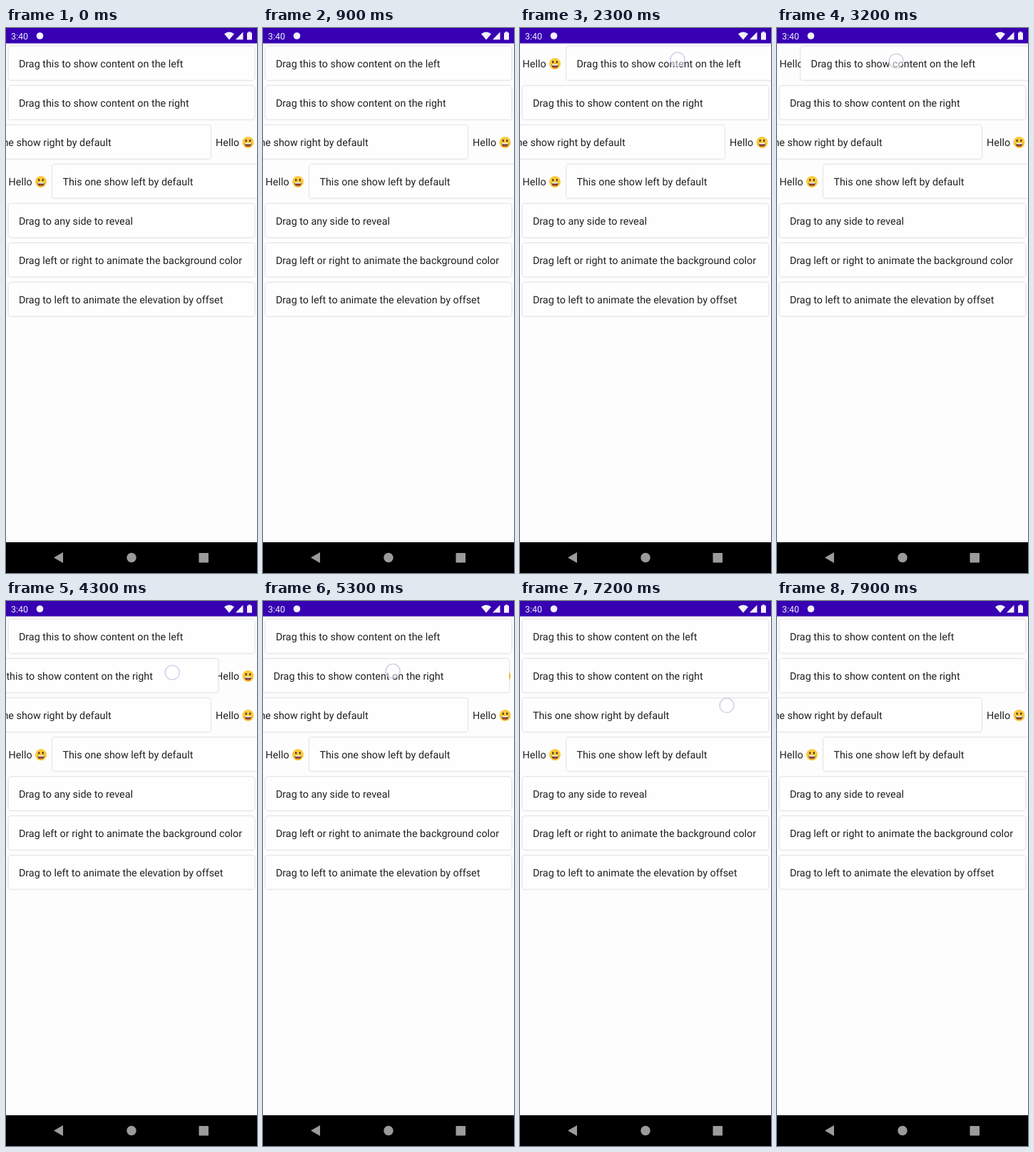
Animation, 352 px wide and 762 px high, one loop 8 s. Source, as an HTML page:

```html
<!DOCTYPE html>
<html lang="en">
<head>
<meta charset="utf-8">
<title>Draggable cards</title>
<style>
  html, body { margin: 0; width: 100%; height: 100%; overflow: hidden; background: #fefdfe; }
  svg { display: block; }
  text { font: 14.34px Roboto, sans-serif; fill: #202020; text-rendering: geometricPrecision; }
  .card rect { fill: #fefefe; filter: drop-shadow(0 .9px 1.1px rgba(0, 0, 0, .27)); }
  #clock { font-size: 12.5px; fill: #f1ecfb; }
</style>
</head>
<body>
<svg width="352" height="762" viewBox="0 0 352 762">
  <defs>
    <g id="smiley">
      <circle r="8" fill="#fcc93a"/>
      <ellipse cx="-2.8" cy="-2.4" rx="1.2" ry="1.8" fill="#4c382c"/>
      <ellipse cx="2.8" cy="-2.4" rx="1.2" ry="1.8" fill="#4c382c"/>
      <path d="M-5 1H5Q4.400 6.200 0 6.200T-5 1Z" fill="#5b3a2c"/>
      <path d="M-4.500 1H4.500L4 2.500H-4Z" fill="#fff"/>
      <path d="M-2.800 5Q0 3 2.800 5Q0 7 -2.800 5Z" fill="#e8534d"/>
    </g>
  </defs>
  <g id="rows"></g>
  <circle id="finger" r="10" fill="#fff" fill-opacity=".5" stroke="#c9c3e2" stroke-width="1.2"/>

  <rect width="352" height="21.500" fill="#3700b3"/>
  <text id="clock" x="7" y="15.500">3:40</text>
  <g fill="#f5f2fc">
    <circle cx="47.500" cy="11" r="4.800"/>
    <path d="M306 8.200Q313 2.800 320 8.200L313 16.500Z"/>
    <path d="M322 16.200L332.500 5.500V16.200Z"/>
    <path d="M338 6.500H340V5H343V6.500H345V16.500H338Z"/>
  </g>

  <rect y="719" width="352" height="43" fill="#000"/>
  <g fill="#9b9b9b">
    <path d="M80 733V748L67 740.500Z"/>
    <circle cx="176" cy="740.500" r="6.700"/>
    <rect x="270.500" y="734" width="13.500" height="13.500" rx=".8"/>
  </g>
</svg>
<script>
const LOOP = 8000, PITCH = 55, REVEAL = 61.5, SLOP = 16;

// side: where the hidden greeting sits; at: resting offset on load
const rows = [
  { label: 'Drag this to show content on the left', side: 1, at: 0 },
  { label: 'Drag this to show content on the right', side: -1, at: 0 },
  { label: 'This one show right by default', side: -1, at: -REVEAL },
  { label: 'This one show left by default', side: 1, at: REVEAL },
  { label: 'Drag to any side to reveal', side: 0, at: 0 },
  { label: 'Drag left or right to animate the background color', side: 0, at: 0 },
  { label: 'Drag to left to animate the elevation by offset', side: 0, at: 0 }
];

// Each drag: touch down, move start, move end, touch up, then the finger path
const drags = [
  { row: 0, down: 1450, from: 1550, to: 2250, up: 2500, x0: 112, x1: 221, y: 44 },
  { row: 0, down: 2850, from: 2950, to: 3450, up: 3600, x0: 215, x1: 120, y: 46 },
  { row: 1, down: 3800, from: 3915, to: 4465, up: 4600, x0: 300, x1: 215, y: 100 },
  { row: 1, down: 4780, from: 4883, to: 5383, up: 5600, x0: 108, x1: 188, y: 98 },
  { row: 2, down: 6150, from: 6300, to: 6800, up: 6950, x0: 111, x1: 196, y: 144 },
  { row: 2, down: 7150, from: 7250, to: 7650, up: 7750, x0: 290, x1: 205, y: 146 }
];

const clamp = (v, lo, hi) => Math.min(hi, Math.max(lo, v));
const smooth = p => p * p * (3 - 2 * p);
const finger = document.getElementById('finger');

function greeting(side) {
  const x = side > 0 ? 3.6 : 294.1;
  return side ? `<text x="${x}" y="55">Hello</text><use href="#smiley" x="${x + 45.4}" y="50"/>` : '';
}

document.getElementById('rows').innerHTML = rows.map((r, i) => `
  <g transform="translate(0 ${i * PITCH})">${greeting(r.side)}
    <g class="card"><rect x="3.6" y="26" width="344.8" height="46.800" rx="3.500"/>
    <text x="17.9" y="55">${r.label}</text></g>
  </g>`).join('');
const cards = document.querySelectorAll('.card');

function draw(t) {
  const offsets = rows.map(r => r.at);
  let touching = false;
  for (const d of drags) {
    if (t < d.down) break;
    const moved = (d.x1 - d.x0) * smooth(clamp((t - d.from) / (d.to - d.from), 0, 1));
    const pull = Math.sign(moved) * Math.max(0, Math.abs(moved) - SLOP);
    const { side } = rows[d.row];
    offsets[d.row] = clamp(offsets[d.row] + pull, Math.min(0, side * REVEAL), Math.max(0, side * REVEAL));
    if (t < d.up) {
      touching = true;
      finger.setAttribute('cx', d.x0 + moved);
      finger.setAttribute('cy', d.y);
    }
  }
  finger.style.display = touching ? '' : 'none';
  cards.forEach((card, i) => card.setAttribute('transform', `translate(${offsets[i]} 0)`));
}

const start = performance.now();
function frame() {
  draw((performance.now() - start) % LOOP);
  requestAnimationFrame(frame);
}
frame();
</script>
</body>
</html>
```
